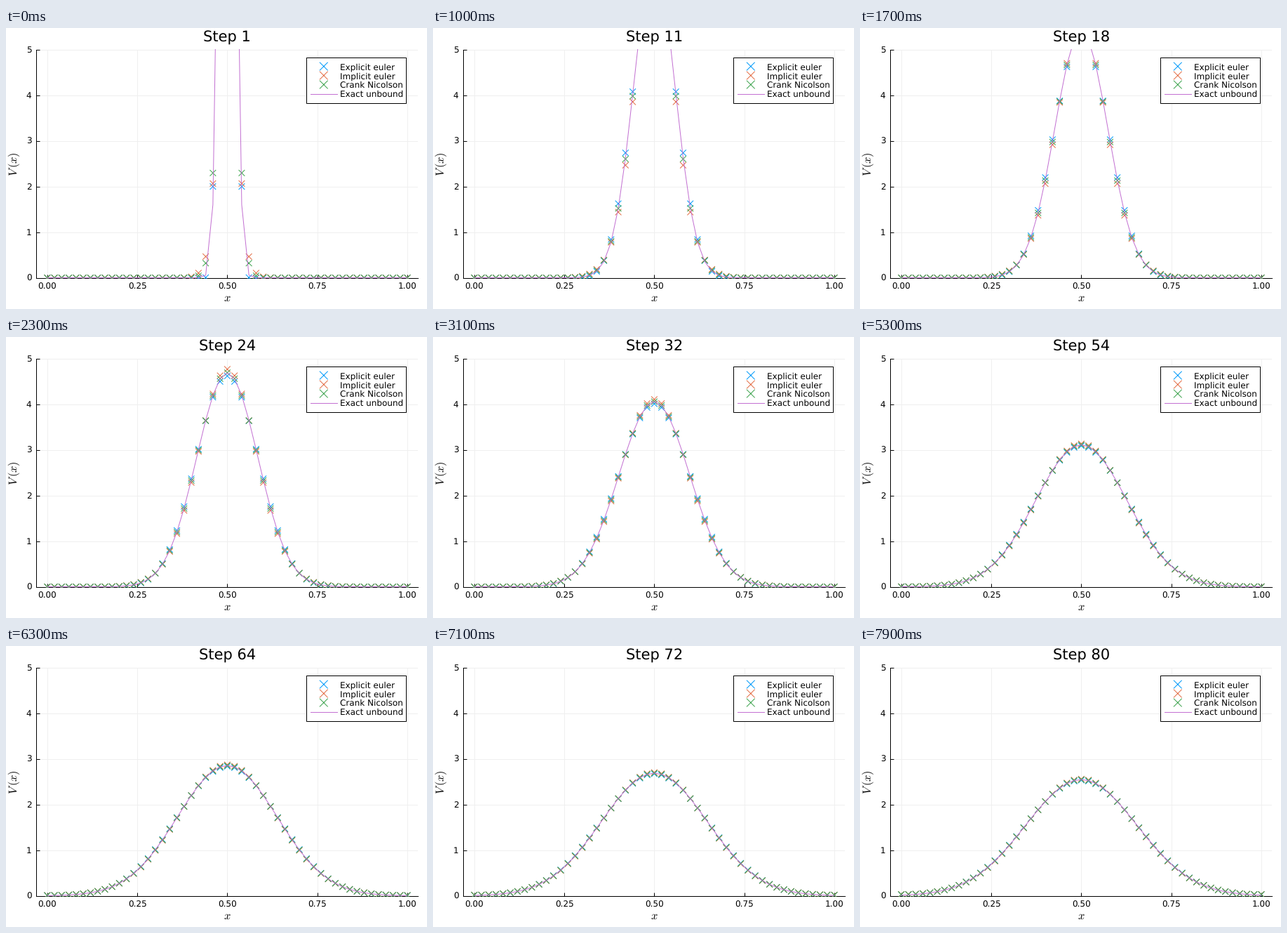
A matplotlib script for the animation above (8000 ms loop, 600 by 400 pixels).

```python
import numpy as np
import matplotlib.pyplot as plt
from matplotlib.animation import FuncAnimation
from matplotlib.patches import Rectangle
from matplotlib.transforms import Bbox

W, H, DPI = 600, 400, 100
PT = 72 / DPI
LEFT, RIGHT, TOP, BOTTOM = 43.4, 587.4, 30.6, 355.6
STEPS = 80
BLUE, ORANGE, GREEN, PURPLE = "#009afa", "#e36f47", "#3ea44e", "#c371d2"

plt.rcParams.update({
    "font.family": "DejaVu Sans",
    "mathtext.fontset": "cm",
    "text.hinting": "none",
    "path.simplify": False,
})

# Cable equation V_t = V_xx - V on [0, 1] with reflecting ends
N = 51
x = np.linspace(0, 1, N)
dx = x[1] - x[0]
dt = 0.375 * dx**2

eye = np.eye(N)
lap = np.eye(N, k=1) + np.eye(N, k=-1) - 2 * eye
lap[0, 1] = lap[-1, -2] = 2
rate = dt * (lap / dx**2 - eye)
schemes = [
    eye + rate,
    np.linalg.inv(eye - rate),
    np.linalg.solve(eye - rate / 2, eye + rate / 2),
]

start = np.exp(-((x - 0.5) / 0.01) ** 2 / 2)
start /= start.sum() * dx


def evolve(step):
    states = [start]
    for _ in range(STEPS):
        states.append(step @ states[-1])
    return states


runs = [evolve(m) for m in schemes]


def exact(n):
    t = n * dt
    return np.exp(-(x - 0.5) ** 2 / (4 * t) - t) / np.sqrt(4 * np.pi * t)


fig = plt.figure(figsize=(W / DPI, H / DPI), dpi=DPI, facecolor="white")
ax = fig.add_axes([LEFT / W, 1 - BOTTOM / H,
                   (RIGHT - LEFT) / W, (BOTTOM - TOP) / H])
ax.set(xlim=(-0.03, 1.03), ylim=(0, 5),
       xticks=np.linspace(0, 1, 5), yticks=range(6))
ax.set_axisbelow(True)
ax.grid(color="#efefef", lw=PT)
ax.tick_params(direction="in", length=5 * PT, width=PT,
               labelbottom=False, labelleft=False)
ax.spines[["top", "right"]].set_visible(False)
ax.spines[["left", "bottom"]].set_linewidth(PT)

# Full-stage layer measured in pixels, y downwards
top = fig.add_axes([0, 0, 1, 1], facecolor="none")
top.set(xlim=(0, W), ylim=(H, 0))
top.axis("off")


def label(px, py, s, size=12, ha="center", **kw):
    kw.setdefault("va", "baseline")
    return top.text(px, py, s, fontsize=size * PT, ha=ha, **kw)


def crosses(cx, cy, rx, ry):
    """Path of x-shaped marks, separated by NaN."""
    sx = np.array([-1, 1, np.nan, -1, 1, np.nan]) * rx
    sy = np.array([-1, 1, np.nan, 1, -1, np.nan]) * ry
    return np.add.outer(cx, sx).ravel(), np.add.outer(cy, sy).ravel()


X_UNIT = (RIGHT - LEFT) / 1.06
Y_UNIT = (BOTTOM - TOP) / 5
MID = (LEFT + RIGHT) / 2

for v in np.linspace(0, 1, 5):
    label(LEFT + (v + 0.03) * X_UNIT, 372, f"{v:.2f}")
for v in range(6):
    label(36.5, BOTTOM - v * Y_UNIT + 4.6, str(v), ha="right")
label(MID, 388.5, "$x$", 16.5)
label(12, 193.5, r"$V\,(x)$", 16.5, rotation=90, va="center")
title = label(MID, 18.4, "", 21)

# Legend
top.add_patch(Rectangle((428.4, 41.6), 142, 65, fc="white", ec="black", lw=PT))
names = ["Explicit euler", "Implicit euler", "Crank Nicolson", "Exact unbound"]
for i, (name, color) in enumerate(zip(names, [BLUE, ORANGE, GREEN, PURPLE])):
    y = 54.6 + 13 * i
    if i < 3:
        top.plot(*crosses([452.8], [y], 5.5, 5.5), color=color, lw=PT)
    else:
        top.plot([434, 472], [y, y], color=color, lw=PT)
    label(475.5, y + 4.6, name, ha="left")

clip = Bbox([[LEFT, H - 357], [RIGHT, H - 30]])
series = [ax.plot([], [], color=c, lw=PT, zorder=3)[0]
          for c in (BLUE, ORANGE, GREEN, PURPLE)]
for line in series:
    line.set_clip_path(None)
    line.set_clip_box(clip)


def draw(i):
    n = i + 1
    title.set_text(f"Step {n}")
    for line, run in zip(series, runs):
        line.set_data(*crosses(x, run[n], 4 / X_UNIT, 4 / Y_UNIT))
    series[3].set_data(x, exact(n))
    return [title, *series]


anim = FuncAnimation(fig, draw, frames=STEPS, interval=100,
                     repeat=True, repeat_delay=0, blit=False)
plt.show()
```
